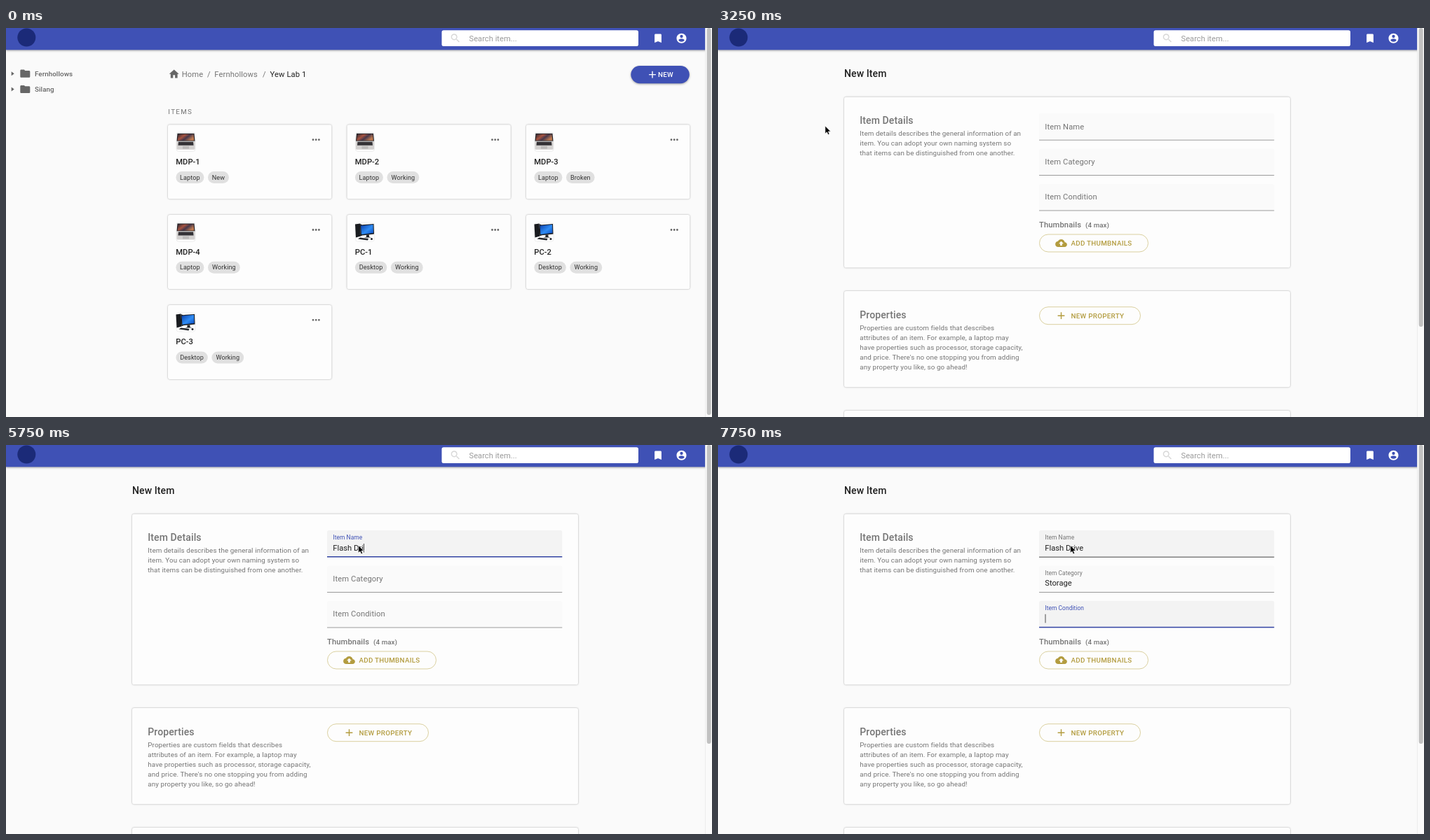
Animation of 1007x556 px, one loop 8 s. Source, as an HTML page:

```html
<!DOCTYPE html>
<html lang="en">
<head>
<meta charset="utf-8">
<title>Inventory: add an item</title>
<style>
  html, body { margin: 0; width: 100%; height: 100%; overflow: hidden; background: #fafafa; }
  svg { display: block; width: 1007px; height: 556px; font-family: Roboto, Arial, sans-serif; }
  text { white-space: pre; }
  .card { fill: #fdfdfd; filter: drop-shadow(0 .8px .8px rgba(0,0,0,.34)); }
  .raised { filter: drop-shadow(0 1.5px 1.5px rgba(0,0,0,.35)); }
  .menu { fill: #fff; filter: drop-shadow(0 2px 3px rgba(0,0,0,.35)); }
</style>
</head>
<body>
<svg id="stage" viewBox="0 0 1007 556"></svg>
<script>
const BLUE = '#3f51b5', GOLD = '#b39c3f', GREY = '#757575', INK = '#212121';
const BODY1 = .0094, BODY2 = .0107, BUTTON = .0286;
const LOOP = 8000, STEP = 250;

const ICONS = {
  bookmark: 'M17 3H7c-1.1 0-2 .9-2 2v16l7-3 7 3V5c0-1.1-.9-2-2-2z',
  account: 'M12 2C6.48 2 2 6.48 2 12s4.48 10 10 10 10-4.48 10-10S17.52 2 12 2zm0 3c1.66 0 3 1.34 3 3s-1.34 3-3 3-3-1.34-3-3 1.34-3 3-3zm0 14.2c-2.5 0-4.71-1.28-6-3.22.03-1.99 4-3.08 6-3.08 1.99 0 5.97 1.09 6 3.08-1.29 1.94-3.5 3.22-6 3.22z',
  search: 'M15.5 14h-.79l-.28-.27C15.41 12.59 16 11.11 16 9.5 16 5.91 13.09 3 9.5 3S3 5.91 3 9.5 5.91 16 9.5 16c1.61 0 3.09-.59 4.23-1.57l.27.28v.79l5 4.99L20.49 19l-4.99-5zm-6 0C7.01 14 5 11.99 5 9.5S7.01 5 9.5 5 14 7.01 14 9.5 11.99 14 9.5 14z',
  folder: 'M10 4H4c-1.1 0-2 .9-2 2v12c0 1.1.9 2 2 2h16c1.1 0 2-.9 2-2V8c0-1.1-.9-2-2-2h-8l-2-2z',
  home: 'M10 20v-6h4v6h5v-8h3L12 3 2 12h3v8z',
  cloud: 'M19.35 10.04C18.67 6.59 15.64 4 12 4 9.11 4 6.6 5.64 5.35 8.04 2.34 8.36 0 10.91 0 14c0 3.31 2.69 6 6 6h13c2.76 0 5-2.24 5-5 0-2.64-2.05-4.78-4.65-4.96zM14 13v4h-4v-4H7l5-5 5 5h-3z',
  add: 'M19 13h-6v6h-2v-6H5v-2h6V5h2v6h6v2z',
  addCircle: 'M13 7h-2v4H7v2h4v4h2v-4h4v-2h-4V7zm-1-5C6.48 2 2 6.48 2 12s4.48 10 10 10 10-4.48 10-10S17.52 2 12 2zm0 18c-4.41 0-8-3.59-8-8s3.59-8 8-8 8 3.59 8 8-3.59 8-8 8z',
  tags: 'M2.5 19.6l1.4.6v-9l-2.5 5.8c-.4 1 .1 2.2 1.1 2.6zM22 16L17.1 4c-.4-1-1.6-1.5-2.6-1.1L7.1 6C6.100 6.400 5.600 7.500 6 8.500l5 12c.4 1 1.600 1.500 2.600 1.100l7.300-3c1-.4 1.500-1.600 1.100-2.600zM4.600 19.800c0 1.100.9 2 2 2h1.400l-3.400-8.300z',
  more: 'M6 10a2 2 0 1 0 0 4 2 2 0 0 0 0-4zm12 0a2 2 0 1 0 0 4 2 2 0 0 0 0-4zm-6 0a2 2 0 1 0 0 4 2 2 0 0 0 0-4z'
};

// Drawing helpers: each returns SVG markup.
const text = (x, y, s, size, fill = INK, weight = 400, spacing = 0, extra = '') =>
  `<text x="${x}" y="${y}" font-size="${size}" fill="${fill}" font-weight="${weight}" letter-spacing="${spacing * size}" ${extra}>${s}</text>`;
const rect = (x, y, w, h, r, attrs) =>
  `<rect x="${x}" y="${y}" width="${w}" height="${h}" rx="${r}" ${attrs}/>`;
const icon = (name, cx, cy, fill, k = .7) =>
  `<path d="${ICONS[name]}" fill="${fill}" transform="translate(${cx - 12 * k} ${cy - 12 * k}) scale(${k})"/>`;
const card = (x, y, w, h) => rect(x, y, w, h, 2.8, 'class="card"');
const group = (id, body) => `<g id="${id}">${body}</g>`;

const CHIP_WIDTH = { Laptop: 40, Desktop: 45.4, New: 30, Working: 45.8, Broken: 40.6 };
const chip = (x, y, label) =>
  rect(x, y, CHIP_WIDTH[label], 17, 8.5, 'fill="#e0e0e0"') +
  text(x + CHIP_WIDTH[label] / 2, y + 11.7, label, 9.1, '#333', 400, .01, 'text-anchor="middle"');

const THUMBS = `<defs>
  <linearGradient id="dusk" x2="1" y2=".5"><stop stop-color="#2a2733"/><stop offset=".4" stop-color="#a5523f"/><stop offset=".65" stop-color="#46374a"/><stop offset="1" stop-color="#c07a50"/></linearGradient>
  <linearGradient id="glow" x2="1" y2="1"><stop stop-color="#0a3ca8"/><stop offset=".55" stop-color="#2f8df5"/><stop offset="1" stop-color="#0b48bd"/></linearGradient>
  <g id="Laptop">
    ${rect(.4, .4, 27.2, 27.2, 3.5, 'fill="#fff" stroke="#e4e4e4" stroke-width=".7"')}
    <path d="M2 2H26L27 13H1z" fill="#1c1b20"/><path d="M3 3H25L25.800 12H2.200z" fill="url(#dusk)"/>
    <path d="M1 13H27V23.500Q27 25 25.500 25H2.500Q1 25 1 23.500z" fill="#d3d1d0"/>
    <path d="M3.500 14H24.500L25 19H3z" fill="#343236"/><path d="M9.500 20H18.500V24H9.500z" fill="#bdbbba"/>
  </g>
  <g id="Desktop">
    ${rect(.4, .4, 27.2, 27.2, 3.5, 'fill="#fff" stroke="#e9e9e9" stroke-width=".7"')}
    <path d="M0 3L7 2L8 20L1 22z" fill="#191b1f"/><path d="M7 2L10 4V19L8 20z" fill="#3b3f45"/>
    <path d="M7 4L26.500 2.500L27 17L8 19z" fill="#14171c"/><path d="M8 5L25.500 3.500L26 15.500L9 17.500z" fill="url(#glow)"/>
    <path d="M16 18H20V21L23 22H13L16 21z" fill="#23262b"/>
    <path d="M7 22L19 23.500L18 26L4 24z" fill="#24272c"/><circle cx="23.500" cy="24" r="1.500" fill="#24272c"/>
  </g>
</defs>`;
const thumb = (kind, x, y, size) =>
  `<use href="#${kind}" transform="translate(${x} ${y}) scale(${size / 28})"/>`;

const outlineButton = (y, w, label, glyph) =>
  rect(458.5, y, w, 25, 12.5, 'fill="none" stroke="#d6cb95" stroke-width=".9"') +
  icon(glyph, 489.5, y + 12.5, GOLD) + text(503.5, y + 16, label, 9.8, GOLD, 500, BUTTON);

const lines = (x, y, gap, rows, spacing) =>
  rows.map((row, i) => text(x, y + gap * i, row, 9.8, GREY, 400, spacing)).join('');

function header() {
  return rect(0, -5, 1007, 36.3, 0, `fill="${BLUE}" class="raised"`) +
    '<circle cx="29.300" cy="13.500" r="13" fill="#1b2a78"/>' +
    group('tools', rect(621.5, 3.3, 280.5, 22.7, 2.8, 'fill="#fff"') +
      icon('search', 641, 14.6, '#d8d8d8') + text(660.5, 18.5, 'Search item...', 11.2, '#9b9b9b') +
      icon('bookmark', 930, 14.7, '#fff') + icon('account', 963.5, 14.7, '#fff'));
}

function listPage() {
  const items = [
    ['MDP-1', 'Laptop', 'New'], ['MDP-2', 'Laptop', 'Working'], ['MDP-3', 'Laptop', 'Broken'],
    ['MDP-4', 'Laptop', 'Working'], ['PC-1', 'Desktop', 'Working'], ['PC-2', 'Desktop', 'Working'],
    ['PC-3', 'Desktop', 'Working']
  ];
  const tree = ['Fernhollows', 'Silang'].map((name, i) => {
    const y = 65.2 + 22.3 * i;
    return `<path d="M7.700 ${y - 3}l4 3l-4 3z" fill="#666"/>` + icon('folder', 27.3, y, '#666') +
      text(41, y + 3.6, name, 9.8, '#666', 500, .007);
  }).join('');
  const cards = items.map(([name, kind, state], i) => {
    const x = 231 + 255.5 * (i % 3), y = 138.3 + 128.8 * Math.floor(i / 3);
    return card(x, y, 233.3, 106) + thumb(kind, x + 11.5, y + 10.5, 28) +
      icon('more', x + 211.2, y + 21.4, '#666') +
      text(x + 11.3, y + 56.5, name, 11.2, INK, 500) +
      chip(x + 11.4, y + 66.6, kind) + chip(x + 17 + CHIP_WIDTH[kind], y + 66.6, state);
  }).join('');
  const menu = group('menu', rect(891, 79.3, 85, 78, 2.8, 'class="menu"') +
    rect(891, 84.5, 85, 34, 0, 'id="rowHover" fill="#ebebeb"') +
    icon('tags', 911, 101.3, '#666') + text(930.5, 105.3, 'Item', 11.2, INK, 400, BODY1) +
    icon('folder', 911, 135, '#666') + text(930.5, 139, 'Folder', 11.2, INK, 400, BODY1));
  return tree + icon('home', 239.7, 65.8, '#666') +
    text(250.7, 70, 'Home', 11.2, GREY, 400, BODY1) + text(287, 70, '/', 11.2, GREY) +
    text(297.3, 70, 'Fernhollows', 11.2, GREY, 400, BODY1) + text(366, 70, '/', 11.2, GREY) +
    text(376.5, 70, 'Yew Lab 1', 11.2, INK, 400, BODY1) +
    rect(891.3, 54, 83.5, 25.2, 12.6, `fill="${BLUE}" class="raised"`) +
    icon('add', 922, 66.6, '#fff') + text(930, 70.2, 'NEW', 9.8, '#fff', 500, BUTTON) +
    text(231.3, 123.3, 'ITEMS', 9.8, GREY, 400, .135) + cards + menu;
}

function templatePage() {
  const option = (x, kind, title, chipX, rows) =>
    card(x, 88, 224.5, 113) + thumb(kind, x + 11, 98.5, 36) +
    text(x + 11.3, 151.6, title, 11.2, INK, 500) + chip(chipX, 139.5, kind) +
    lines(x + 11.3, 172.4, 12.7, rows, 0);
  return text(21, 70, 'Choose template', 14, INK, 500, .0075) +
    rect(21.7, 88.5, 222.8, 111.8, 2.8, `fill="#f7f8fc" stroke="${BLUE}" stroke-width="1.4" stroke-dasharray="5 3"`) +
    icon('addCircle', 133, 133, BLUE) +
    text(133.3, 159, 'No Template', 11.2, BLUE, 400, BODY1, 'text-anchor="middle"') +
    option(267.6, 'Laptop', 'Mondave Pro Tem...', 397,
      ['The Mondave Pro is a line of', 'Velandorn portable computers int...']) +
    option(514.4, 'Desktop', 'PC Template', 602,
      ['A personal computer (PC) is a', 'multi-purpose computer whose si...']);
}

const FIELDS = ['Item Name', 'Item Category', 'Item Condition'];
const fieldTop = i => 122 + 50.4 * i;

function formPage() {
  return text(180, 70, 'New Item', 14, INK, 500, .0075) +
    card(180, 98.8, 636, 243.7) + text(202.3, 137.2, 'Item Details', 14, GREY, 500, .0075) +
    lines(202.3, 154.4, 14, ['Item details describes the general information of an',
      'item. You can adopt your own naming system so',
      'that items can be distinguished from one another.'], BODY2) +
    text(458, 284.7, 'Thumbnails', 11.2, GREY, 500, .01) +
    text(524, 284.5, '(4 max)', 9.8, GREY, 500, .007) +
    outlineButton(295, 155, 'ADD THUMBNAILS', 'cloud') +
    card(180, 376, 636, 137.3) + text(202.3, 414.7, 'Properties', 14, GREY, 500, .0075) +
    lines(202.3, 431.6, 14, ['Properties are custom fields that describes',
      'attributes of an item. For example, a laptop may',
      'have properties such as processor, storage capacity,',
      "and price. There's no one stopping you from adding",
      'any property you like, so go ahead!'], BODY2) +
    outlineButton(398.7, 144, 'NEW PROPERTY', 'add') +
    card(180, 547, 636, 60) + group('fields', '');
}

// Latest entry at or before t in a [time, value] list.
const at = (t, track) => track.reduce((v, [time, next]) => t >= time ? next : v, undefined);

const TYPING = [
  [[4250, ''], [4750, 'F'], [5000, 'Fl'], [5250, 'Flash'], [5500, 'Flash D'], [5750, 'Flash Dri'], [6000, 'Flash Drive']],
  [[6250, ''], [6500, 'S'], [6750, 'St'], [7000, 'Stor'], [7250, 'Storage']],
  [[7500, '']]
];
const SUGGESTIONS = [['Flashdrive'], ['s', 'Storage'], []];

const POINTER = [
  [0, 806, 600], [250, 806, 538], [500, 872, 290], [750, 931, 74], [1000, 931, 71],
  [1250, 928.500, 90], [1750, 928.500, 90], [2000, 610, 118], [2250, 190, 145], [2500, 106.500, 143.500],
  [3000, 106.500, 143.500], [3250, 152.800, 140], [3500, 380, 144], [3750, 502.500, 143.300], [8000, 502.500, 143.300]
];

function pointerAt(t) {
  const i = POINTER.findIndex(p => p[0] > t);
  const [t0, x0, y0] = POINTER[i - 1], [t1, x1, y1] = POINTER[i];
  const k = (t - t0) / (t1 - t0);
  return [x0 + (x1 - x0) * k, y0 + (y1 - y0) * k];
}

function field(i, value, focused, hovered) {
  const y = fieldTop(i), open = value !== undefined;
  const fill = focused || hovered ? '#f3f3f3' : '#fafafa';
  const line = focused ? '#3344a3' : hovered ? '#303030' : '#919191';
  return `<path d="M458 ${y + 38.500}V${y + 2.800}q0-2.800 2.800-2.800H790.500q2.800 0 2.800 2.800V${y + 38.500}z" fill="${fill}"/>` +
    rect(458, y + (focused ? 37 : 37.7), 335.3, focused ? 1.5 : .9, 0, `fill="${line}"`) +
    text(466.3, y + (open ? 13.4 : 22.5), FIELDS[i], open ? 8.4 : 11.2, focused ? BLUE : GREY, 400, BODY1) +
    (open ? text(466.3, y + 29, value, 11.2, INK, 400, 0, focused ? 'id="typed"' : '') : '');
}

function suggestions(i, value) {
  const found = value ? SUGGESTIONS[i].filter(s =>
    s !== value && s.toLowerCase().startsWith(value.toLowerCase())) : [];
  if (!found.length) return '';
  const y = fieldTop(i) + 39.4;
  return rect(457.6, y, 134.4, 11 + 25 * found.length, 2.8, 'fill="#292a2d" stroke="#4a4b4e" stroke-width=".5" class="raised"') +
    found.map((s, k) => text(466, y + 21.7 + 25 * k, s, 9.3, '#fff', 500)).join('');
}

const stage = document.getElementById('stage');
stage.innerHTML = THUMBS + rect(0, 0, 1007, 556, 0, 'fill="#fafafa"') +
  group('list', listPage()) + group('template', templatePage()) + group('form', formPage()) + header() +
  group('scroll', rect(997.3, 0, 10, 556, 0, 'fill="#fafafa"') + rect(997.3, 0, .7, 556, 0, 'fill="#e6e6e6"') +
    rect(999.7, 0, 6, 553, 3, 'id="thumb" fill="#c1c1c1"')) +
  '<path id="pointer" d="M0 0V11L2.500 8.700L4.200 12.500L6.200 11.600L4.500 8H8z" fill="#000" stroke="#fff" stroke-width=".7"/>';

const $ = id => document.getElementById(id);
const show = (id, on) => $(id).setAttribute('display', on ? 'inline' : 'none');

function drawForm(t, py) {
  const values = TYPING.map(track => at(t, track));
  const active = values.findLastIndex(v => v !== undefined);
  const over = t >= 3750 ? 0 : -1;
  $('fields').innerHTML = FIELDS.map((_, i) => field(i, values[i], i === active, i === over)).join('') +
    (active < 0 ? '' : suggestions(active, values[active]));
  if (active < 0) return;
  const x = 466.6 + $('typed').getComputedTextLength();
  $('fields').insertAdjacentHTML('beforeend', rect(x, fieldTop(active) + 19, .8, 12.5, 0, `fill="${INK}"`));
}

function update(time) {
  const t = Math.floor(time % LOOP / STEP) * STEP;
  const page = at(t, [[0, 'list'], [1500, 'template'], [3250, 'form']]);
  for (const id of ['list', 'template', 'form']) show(id, id === page);
  show('menu', t >= 1000);
  show('rowHover', t >= 1250);
  show('scroll', page !== 'template');
  $('thumb').setAttribute('height', page === 'form' ? 427 : 553);
  $('tools').setAttribute('transform', `translate(${page === 'template' ? 10.4 : 0} 0)`);
  $('pointer').setAttribute('transform', `translate(${pointerAt(t)})`);
  if (page === 'form') drawForm(t);
}

let start;
function tick(now) {
  start ??= now;
  update(now - start);
  requestAnimationFrame(tick);
}
update(0);
requestAnimationFrame(tick);
</script>
</body>
</html>
```
